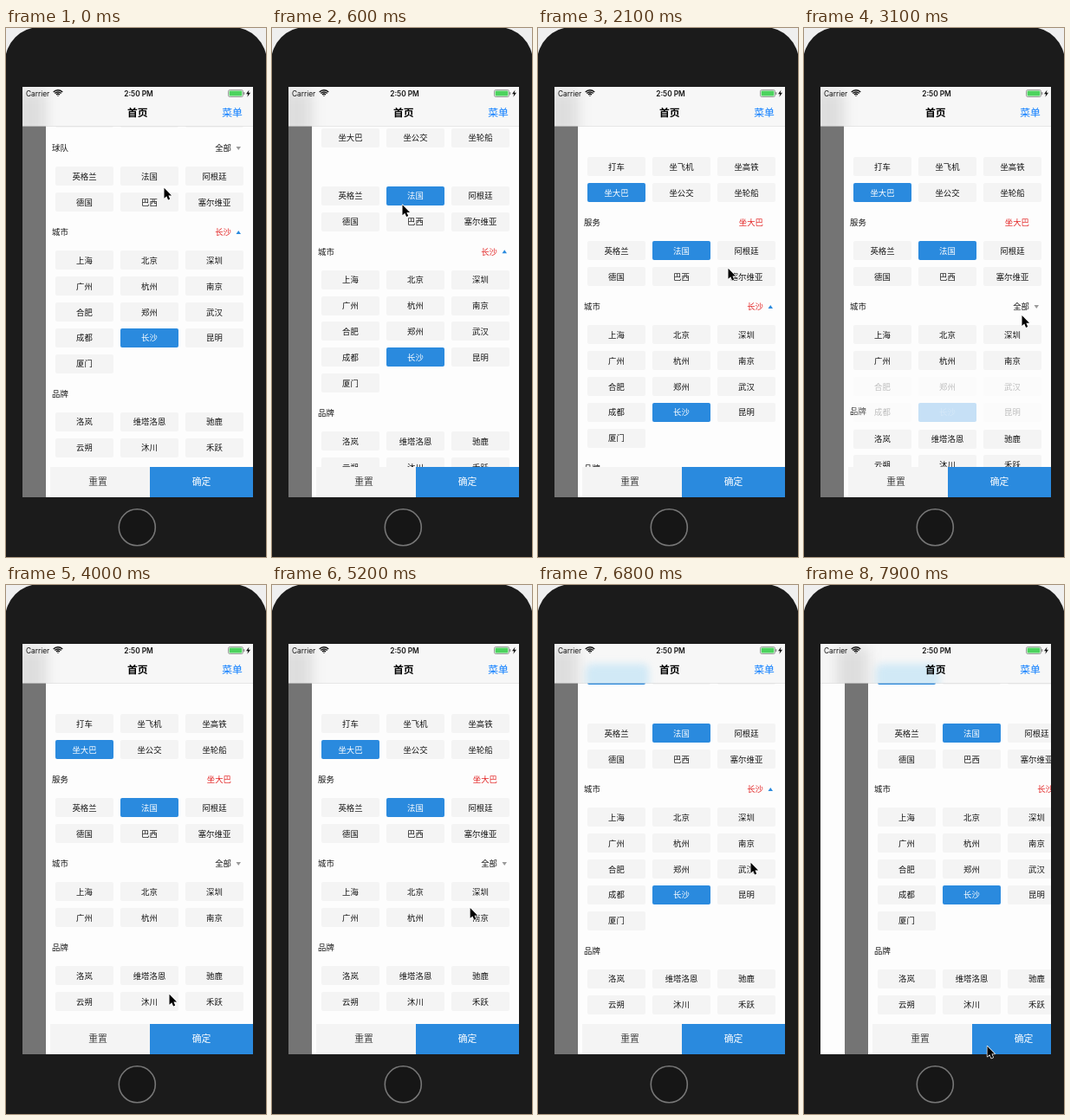
Recreate the animation shown at these times as an HTML page with a canvas. Size 300x611 px, loop 8000 ms.

```html
<!DOCTYPE html>
<html lang="zh-CN">
<head>
<meta charset="utf-8">
<style>
html, body { margin: 0; width: 100%; height: 100%; overflow: hidden; background: #efefef; }
canvas { display: block; width: 300px; height: 611px; }
</style>
</head>
<body>
<canvas></canvas>
<script>
const canvas = document.querySelector('canvas');
const c = canvas.getContext('2d');
const ratio = Math.max(1, window.devicePixelRatio || 1);
canvas.width = 300 * ratio;
canvas.height = 611 * ratio;

const CJK = '"Noto Sans CJK SC", "Noto Sans CJK", sans-serif';
const LATIN = 'Inter, Roboto, sans-serif';
const BLUE = '#2a8ade', RED = '#e32626', DARK = '#151515', PALE = '#f4f4f4', WHITE = '#fdfdfd';
const LOOP = 8000, STEP = 100;
const ROW = 29.87, COL = 75.2, MAX_SCROLL = 86;
const SCREEN = { x: 19, y: 68, w: 266, h: 474 };

const SERVICES = '打车 坐飞机 坐高铁 坐大巴 坐公交 坐轮船'.split(' ');
const TEAMS = '英格兰 法国 阿根廷 德国 巴西 塞尔维亚'.split(' ');
const CITIES = '上海 北京 深圳 广州 杭州 南京 合肥 郑州 武汉 成都 长沙 昆明 厦门'.split(' ');
const BRANDS = '洛岚 维塔洛恩 驰鹿 云朔 沐川 禾跃'.split(' ');

// Moments of the gestures, in ms
const PICK_TEAM = 300, PULL_DOWN = 500, PICK_BUS = 1400, FOLD = 2900,
  UNFOLD = 5600, PULL_UP = 6000, REUSE = 6500, CONFIRM = 7800;

// Where the pointer rests or turns
const POINTER = [
  { t: 0, x: 182, y: 184 },
  { t: PICK_TEAM, x: 172, y: 173 },
  { t: 900, x: 128, y: 234 },
  { t: PICK_BUS, x: 88, y: 191 },
  { t: 2100, x: 219, y: 277 },
  { t: FOLD, x: 257, y: 318 },
  { t: 4000, x: 188, y: 472 },
  { t: 4600, x: 188, y: 472 },
  { t: UNFOLD, x: 250, y: 318 },
  { t: 6100, x: 250, y: 327 },
  { t: 6800, x: 245, y: 320 },
  { t: CONFIRM, x: 211, y: 532 }
];
const ARROW = new Path2D('M0 0V13L3 10.3L5 15L7.3 14L5.3 9.5H9.3Z');
const BOLT = new Path2D('M3.5 0L0 4.7H2.2L1.4 8.3L5 3.3H2.7Z');

function ease(t, start, length) {
  const k = Math.min(1, Math.max(0, (t - start) / length));
  return k * k * (3 - 2 * k);
}

function rect(x, y, w, h, color, r = 0) {
  c.fillStyle = color;
  c.beginPath();
  c.roundRect(x, y, w, h, r);
  c.fill();
}

function clip(x, y, w, h) {
  c.beginPath();
  c.rect(x, y, w, h);
  c.clip();
}

function text(s, x, y, size, color = DARK, align = 'center', weight = 400, family = CJK) {
  c.font = `${weight} ${size}px ${family}`;
  c.textAlign = align;
  c.fillStyle = color;
  c.fillText(s, x, y + size * 0.37);
}

function triangle(y, dir, color) {
  c.fillStyle = color;
  c.beginPath();
  [[-2.75, -2], [2.75, -2], [0, 2]].forEach(([dx, dy]) => c.lineTo(268.3, 0) || c.lineTo(268.3 + dx, y + dy * dir));
  c.fill();
}

function toggle(y, open) {
  const dir = open ? -1 : 1;
  c.fillStyle = open ? BLUE : '#999';
  c.beginPath();
  c.moveTo(265.5, y - 2 * dir);
  c.lineTo(271, y - 2 * dir);
  c.lineTo(268.25, y + 2 * dir);
  c.fill();
}

function header(y, title, value) {
  text(title, 53, y, 9.4, DARK, 'left');
  if (value) text(value, 260, y, 9.4, value === '全部' ? DARK : RED, 'right');
}

function cells(y, names, chosen, fold = 0) {
  names.forEach((name, i) => {
    const x = Math.round(57 + i % 3 * COL);
    const mid = y + 32.4 + Math.floor(i / 3) * ROW;
    const on = name === chosen;
    c.globalAlpha = i < 6 ? 1 : 1 - fold;
    rect(x, Math.round(mid - 11), 67, 22, on ? BLUE : PALE, 2);
    text(name, x + 33.5, mid, 9.4, on ? '#fff' : DARK);
  });
  c.globalAlpha = 1;
}

function drawer(t, scroll, fold) {
  rect(19, 113, 27, 429, '#747474');
  rect(46, 113, 239, 429, WHITE);

  const [service, team, city] = [0, 1, 2].map(i => 128 + 97 * i - scroll);
  const brand = city + 37.2 + ROW * (5 - 3 * fold);
  const open = t < FOLD || t >= UNFOLD;

  // The service header reappears one section too low after a choice
  if (t < PICK_BUS) header(service, '服务');
  else if (t < REUSE) header(team, '服务', '坐大巴');
  if (t < PICK_TEAM) {
    header(team, '球队', '全部');
    toggle(team, false);
  }
  header(city, '城市', open ? '长沙' : '全部');
  toggle(city, open);
  header(brand, '品牌');

  cells(service, SERVICES, t >= PICK_BUS && '坐大巴');
  cells(team, TEAMS, t >= PICK_TEAM && '法国');
  cells(city, CITIES, '长沙', fold);
  cells(brand, BRANDS);

  rect(46, 507, 120, 35, WHITE);
  rect(51, 507, 115, 35, PALE);
  rect(166, 507, 119, 35, BLUE);
  text('重置', 106, 524, 10.8, '#444');
  text('确定', 225.5, 524, 10.8, '#fff');
}

function statusBar() {
  text('Carrier', 23, 75.6, 8.3, '#111', 'left', 400, LATIN);
  text('2:50 PM', 153, 75.6, 8.3, '#111', 'center', 600, LATIN);

  c.strokeStyle = '#111';
  c.lineWidth = 1.4;
  for (let r = 0.6; r < 8; r += 2.2) {
    c.beginPath();
    c.arc(60, 79, r, -Math.PI * 0.76, -Math.PI * 0.24);
    c.stroke();
  }

  c.strokeStyle = '#777';
  c.lineWidth = 0.7;
  c.beginPath();
  c.roundRect(256.5, 71.5, 17, 8, 1.8);
  c.stroke();
  rect(257.6, 72.6, 14.8, 5.8, '#4cd35e', 1);
  rect(274.3, 74, 1, 3, '#777', 0.5);
  c.save();
  c.translate(277, 71.5);
  c.fillStyle = '#111';
  c.fill(BOLT);
  c.restore();
}

function navBar(t, scroll, slide) {
  c.save();
  clip(19, 68, 266, 45.5);
  rect(19, 68, 266, 46, '#f7f7f7');
  // Content glows through the translucent bar
  c.filter = `blur(${8 * ratio}px)`;
  rect(10 + slide, 72, 36, 54, 'rgba(90,90,90,.16)');
  if (t >= PICK_BUS) {
    c.filter = `blur(${4 * ratio}px)`;
    rect(55 + slide, 177 - scroll, 73, 30, 'rgba(130,205,245,.32)', 8);
  }
  c.filter = 'none';
  rect(19, 113, 266, 0.5, '#aaa');
  c.restore();

  text('首页', 151.8, 98, 11.8, '#000', 'center', 700);
  text('菜单', 261, 98, 11.8, '#0a7cff', 'center', 500);
}

function pointer(t) {
  const i = POINTER.findLastIndex(p => p.t <= t);
  const a = POINTER[i], b = POINTER[i + 1] || a;
  const k = ease(t, a.t, b.t - a.t || 1);
  c.save();
  c.translate(a.x + (b.x - a.x) * k + 0.5, a.y + (b.y - a.y) * k + 0.7);
  c.scale(0.92, 0.92);
  c.lineJoin = 'round';
  c.lineWidth = 1.5;
  c.strokeStyle = '#fff';
  c.stroke(ARROW);
  c.fillStyle = '#000';
  c.fill(ARROW);
  c.restore();
}

function phone() {
  rect(0, 0, 300, 611, '#efefef');
  rect(-1, -1, 302, 660, '#1b1b1b', 40);
  c.fillStyle = '#161616';
  c.strokeStyle = '#777';
  c.lineWidth = 1.6;
  c.beginPath();
  c.arc(151.3, 576.8, 21, 0, Math.PI * 2);
  c.fill();
  c.stroke();
}

function draw(t) {
  const scroll = MAX_SCROLL * (1 - ease(t, PULL_DOWN, 300) + ease(t, PULL_UP, 480));
  const fold = ease(t, FOLD, 300) - ease(t, UNFOLD, 300);
  const slide = Math.max(0, t - CONFIRM) * 0.28;

  c.setTransform(ratio, 0, 0, ratio, 0, 0);
  phone();
  c.save();
  clip(SCREEN.x, SCREEN.y, SCREEN.w, SCREEN.h);
  rect(SCREEN.x, SCREEN.y, SCREEN.w, SCREEN.h, WHITE);
  c.translate(slide, 0);
  drawer(t, scroll, fold);
  c.translate(-slide, 0);
  navBar(t, scroll, slide);
  statusBar();
  c.restore();
  pointer(t);
}

function tick() {
  draw(Math.floor(performance.now() % LOOP / STEP) * STEP);
  requestAnimationFrame(tick);
}
tick();
</script>
</body>
</html>
```
